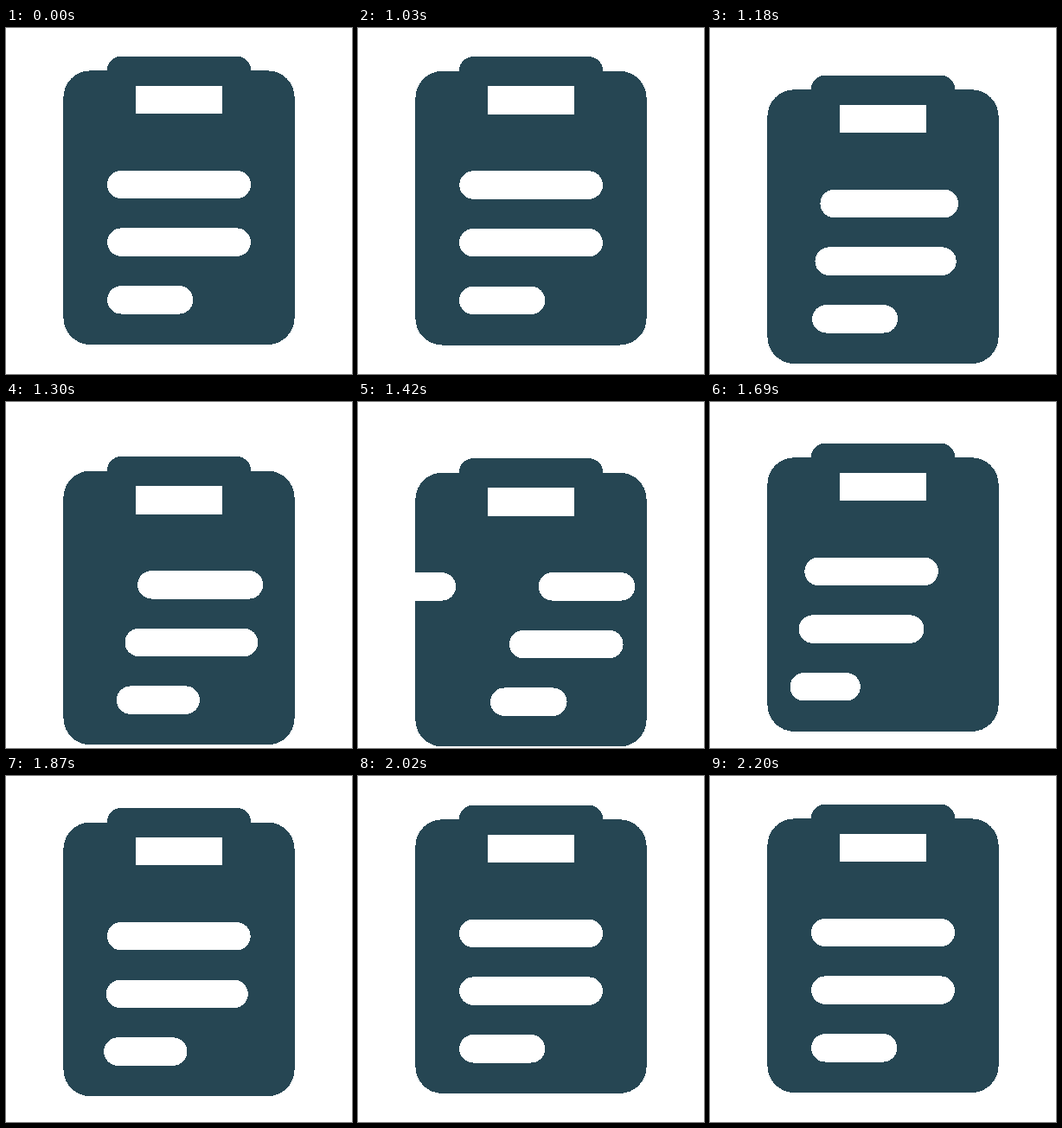
An HTML page for the animation above (2260 ms loop, 400 by 400 pixels).

```html
<!DOCTYPE html>
<html>
<head>
<meta charset="utf-8">
<style>
  html, body { margin: 0; width: 100%; height: 100%; overflow: hidden; background: #fff; }
  svg { display: block; width: 100vw; height: 100vh; shape-rendering: crispEdges; }
</style>
</head>
<body>
<svg viewBox="0 0 400 400">
  <g id="board">
    <g fill="#264653">
      <rect x="66.4" y="50" width="267.2" height="316.67" rx="31"/>
      <rect x="116.67" y="33.33" width="166.67" height="50" rx="16.67"/>
    </g>
    <path d="M150 67.3h100v32.6h-100z" fill="#fff"/>
    <g id="lines" stroke="#fff" stroke-width="32.5" stroke-linecap="round"/>
  </g>
</svg>
<script>
const LOOP = 2260, START = 1030, STEP = 30;
const LEFT = 133.33, OFF_LEFT = 41.67, OFF_RIGHT = 358.33;
const REST = -0.67, DROP = 32.4;
const board = document.getElementById('board');
const group = document.getElementById('lines');

// Eased progress from start to end along cubic-bezier(a, 0, b, 1)
function ease(now, start, end, a, b) {
  const x = (now - start) / (end - start);
  if (x <= 0) return 0;
  if (x >= 1) return 1;
  let lo = 0, hi = 1, u;
  for (let i = 0; i < 24; i++) {
    u = (lo + hi) / 2;
    const v = 1 - u;
    if (3 * v * v * u * a + 3 * v * u * u * b + u * u * u < x) lo = u; else hi = u;
  }
  return u * u * (3 - 2 * u);
}

const mix = (a, b, p) => a + (b - a) * p;

function addLine(y) {
  const line = document.createElementNS('http://www.w3.org/2000/svg', 'line');
  line.setAttribute('y1', y);
  line.setAttribute('y2', y);
  return group.appendChild(line);
}

function span(line, x1, x2) {
  line.setAttribute('x1', x1);
  line.setAttribute('x2', x2 + 0.01);
}

const rows = [[181.67, 266.67], [248.33, 266.67], [315, 200]].map(([y, right]) =>
  ({ right, leaving: addLine(y), entering: addLine(y) }));

function draw(time) {
  const n = Math.floor((time % LOOP - START) / STEP);
  const drop = DROP * (ease(n, -1, 13.55, .333, .19) - ease(n, 13.55, 38.5, .333, .19));
  board.setAttribute('transform', `translate(0 ${REST + drop})`);
  rows.forEach(({ right, leaving, entering }, i) => {
    const out = ease(n - 1.95 * i, -1, 19, .9, .75);
    const into = ease(n - 2.1 * i, 9.95, 28.95, .2, .18);
    span(leaving, mix(LEFT, OFF_RIGHT, out), mix(right, OFF_RIGHT, out));
    span(entering, mix(OFF_LEFT, LEFT, into), mix(OFF_LEFT, right, into));
  });
}

const origin = performance.now();
function tick() {
  draw(performance.now() - origin);
  requestAnimationFrame(tick);
}
tick();
</script>
</body>
</html>
```
